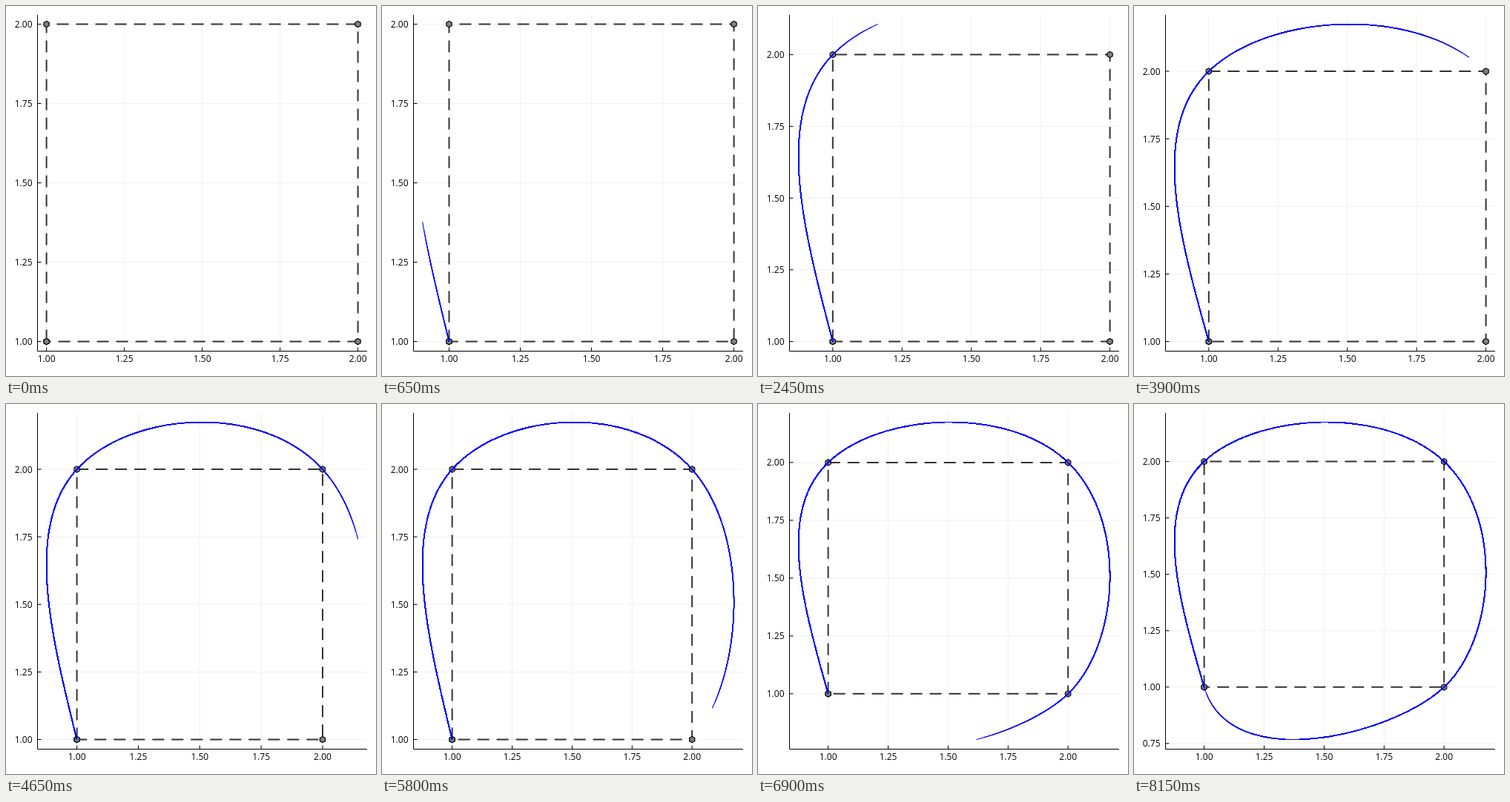
These frames come from a looping animation (499 by 499 pixels, 8.2 s). An HTML page with a canvas:

```html
<!DOCTYPE html>
<html lang="en">
<head>
<meta charset="utf-8">
<title>Spline through a square</title>
<style>
  html, body { margin: 0; width: 100%; height: 100%; overflow: hidden; background: #fff; }
  canvas { display: block; width: 499px; height: 499px; }
</style>
</head>
<body>
<canvas id="stage" width="499" height="499"></canvas>
<script>
const ctx = document.getElementById('stage').getContext('2d');

const STEP = 50, LOOP = 8200, PER_SEGMENT = 41;
const PLOT = { left: 42, right: 487, top: 12, bottom: 465 };
const DATA = { left: 54.6, right: 474.6, top: 24.5, bottom: 452.5 };
const PAD = 0.03;

// Corners of the square and the spline's slope at each of them.
const knots = [[1, 1], [1, 2], [2, 2], [2, 1], [1, 1]];
const slopes = [[-9, 33], [18, 18], [21, -21], [-18, -18], [-9, 33]]
  .map(s => s.map(v => v / 28));

function hermite(a, b, da, db, u) {
  const v = 1 - u;
  return v * v * (a * (1 + 2 * u) + da * u) + u * u * (b * (3 - 2 * u) - db * v);
}

const curve = Array.from({ length: LOOP / STEP }, (_, i) => {
  const s = Math.floor(i / PER_SEGMENT);
  const u = (i % PER_SEGMENT) / (PER_SEGMENT - 1);
  return [0, 1].map(d =>
    hermite(knots[s][d], knots[s + 1][d], slopes[s][d], slopes[s + 1][d], u));
});

function range(points, d) {
  const values = points.map(p => p[d]);
  return [Math.min(...values), Math.max(...values)];
}

function scale([lo, hi], from, to) {
  return v => from + (to - from) * (v - lo) / (hi - lo);
}

function ticks([lo, hi]) {
  const pad = (hi - lo) * PAD;
  const list = [];
  for (let i = Math.ceil((lo - pad) * 4); i <= (hi + pad) * 4; i++) list.push(i / 4);
  return list;
}

function line(points, color, width, dash = []) {
  ctx.strokeStyle = color;
  ctx.lineWidth = width;
  ctx.setLineDash(dash);
  ctx.beginPath();
  points.forEach(p => ctx.lineTo(...p));
  ctx.stroke();
}

function marker([x, y]) {
  ctx.beginPath();
  for (let i = 0; i < 6; i++) {
    const a = Math.PI * (i / 3 + 0.5);
    ctx.lineTo(x + 4.2 * Math.cos(a), y + 4.2 * Math.sin(a));
  }
  ctx.closePath();
  ctx.fillStyle = '#808080';
  ctx.fill();
  ctx.strokeStyle = '#000';
  ctx.lineWidth = 1.1;
  ctx.setLineDash([]);
  ctx.stroke();
}

function axes(xs, ys, X, Y) {
  const { left, right, top, bottom } = PLOT;
  const ax = left + 0.5, ay = bottom + 0.5;
  xs.forEach(v => line([[X(v), top], [X(v), bottom]], '#f0f0f0', 1));
  ys.forEach(v => line([[left, Y(v)], [right, Y(v)]], '#f0f0f0', 1));
  line([[ax, top], [ax, ay], [right, ay]], '#000', 1);
  ctx.fillStyle = '#000';
  ctx.font = '12px "Open Sans", "Noto Sans", sans-serif';
  ctx.textAlign = 'center';
  xs.forEach(v => {
    line([[X(v), ay], [X(v), ay - 5]], '#000', 1);
    ctx.fillText(v.toFixed(2), X(v), 480);
  });
  ctx.textAlign = 'right';
  ys.forEach(v => {
    line([[ax, Y(v)], [ax + 5, Y(v)]], '#000', 1);
    ctx.fillText(v.toFixed(2), 35.5, Y(v) + 4.5);
  });
}

function draw(step) {
  const drawn = curve.slice(0, step + 1);
  const all = knots.concat(drawn);
  const xr = range(all, 0), yr = range(all, 1);
  const X = scale(xr, DATA.left, DATA.right);
  const Y = scale(yr, DATA.bottom, DATA.top);
  const place = p => [X(p[0]), Y(p[1])];

  ctx.fillStyle = '#fff';
  ctx.fillRect(0, 0, 499, 499);
  axes(ticks(xr), ticks(yr), X, Y);

  const corners = knots.map(place);
  line(corners, '#333', 2, [16, 10]);
  corners.forEach(marker);

  // Overlaid partial paths make the older stretch heavier than the tip.
  const path = drawn.map(place);
  ctx.lineJoin = 'round';
  for (let n = 2; n <= path.length; n++) line(path.slice(0, n), '#00f', 1.1);
  ctx.lineJoin = 'miter';
}

let shown = -1;
function tick() {
  const step = Math.floor((performance.now() % LOOP) / STEP);
  if (step !== shown) draw(shown = step);
  requestAnimationFrame(tick);
}
tick();
</script>
</body>
</html>
```
